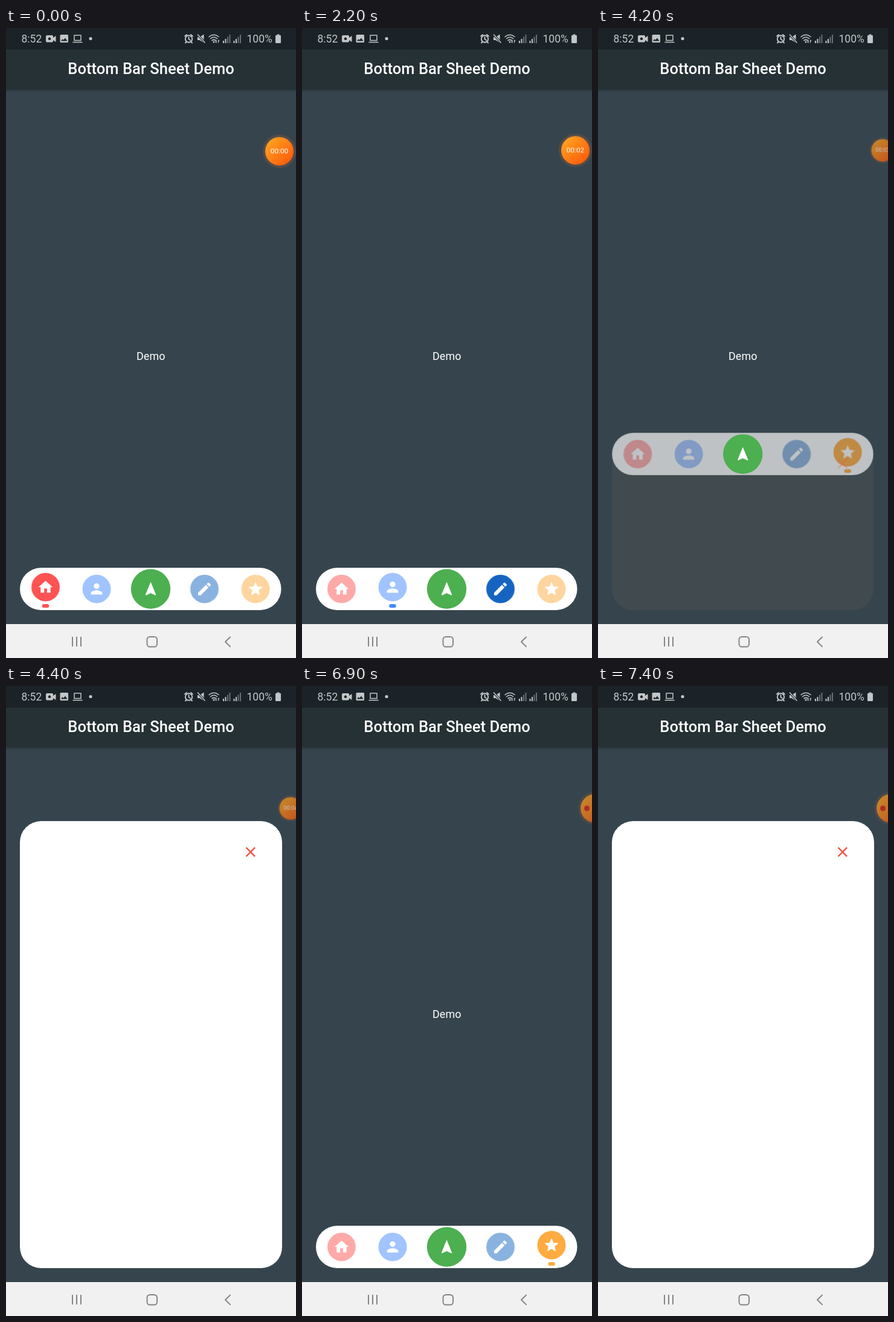
These frames come from a looping animation (480 by 1040 pixels, 8000 ms). An HTML page:

```html
<!DOCTYPE html>
<html lang="en">
<head>
<meta charset="utf-8">
<title>Bottom Bar Sheet Demo</title>
<style>
@property --open { syntax: "<number>"; inherits: true; initial-value: 0; }
@property --up { syntax: "<number>"; inherits: true; initial-value: 0; }
@property --sec { syntax: "<integer>"; inherits: true; initial-value: 0; }

html, body { margin: 0; width: 100%; height: 100%; overflow: hidden; background: #36454d; }
body { position: relative; font-family: Roboto, sans-serif; }
svg { position: absolute; left: 0; top: 0; width: 480px; height: 1040px; }

/* Every part shares one 8 s clock that advances in 100 ms ticks */
#stage, #status, #badge, #time, #time::before, #dot, #ripple, .lit, .item {
  animation: 8s step-end -5ms infinite;
}

/* Expanding sheet */
#stage { position: absolute; width: 480px; height: 1040px; overflow: hidden; animation-name: sheet; }
#sheet {
  --grey: calc(255 * var(--open));
  position: absolute; left: 23px; top: calc(891px - 668px * var(--open));
  width: calc(432.5px + 1.5px * var(--open)); height: calc(70px + 668px * var(--open));
  border-radius: 35px; overflow: hidden;
  background: rgba(var(--grey), var(--grey), var(--grey), var(--open));
}
#ripple {
  position: absolute; left: 340px; top: 10.5px; width: 82px; height: 82px;
  border-radius: 50%; background: rgba(255, 255, 255, .09); animation-name: ripple;
}
.bar { transform: translate(calc(.7px * var(--open)), calc(-668px * var(--open))); }
#tabs { opacity: calc(1 - var(--open)); }
#main { opacity: calc(1.8 - 1.8 * var(--open)); }
#close { transform: translate(404.8px, calc(274px + 668px * (1 - var(--open)))); opacity: var(--open); }
@keyframes sheet {
  0% { --open: 0; }
  51.25% { --open: 0; animation-timing-function: steps(3); }
  55% { --open: 1; }
  75% { --open: .734; animation-timing-function: steps(3); }
  78.75% { --open: 0; }
  88.75% { --open: 0; animation-timing-function: steps(3); }
  92.5%, 100% { --open: 1; }
}
@keyframes ripple {
  0% { opacity: 0; }
  75% { opacity: 1; }
  78.75%, 100% { opacity: 0; }
}

/* Tabs: colour switches at once, then the icon lifts */
.item { fill: var(--c); }
.lift { transform: translateY(calc(-3px * var(--up))); }
.mark { opacity: var(--up); transform: scale(var(--up)); transform-origin: 0 28px; }
.icon { fill: #fff; transform: scale(1.17) translate(-12px, -12px); }
#home { --c: #ff5252; animation-name: homeUp; }
#user { --c: #448aff; animation-name: userUp; }
#pen { --c: #1565c0; animation-name: penUp; }
#star { --c: #ffab40; animation-name: starUp; }
#home .lit { animation-name: homeLit; }
#user .lit { animation-name: userLit; }
#pen .lit { animation-name: penLit; }
#star .lit { animation-name: starLit; }
@keyframes homeLit { 0% { opacity: 1; } 15%, 100% { opacity: .5; } }
@keyframes userLit { 0% { opacity: .5; } 15% { opacity: 1; } 27.5%, 100% { opacity: .5; } }
@keyframes penLit { 0% { opacity: .5; } 27.5% { opacity: 1; } 38.75%, 100% { opacity: .5; } }
@keyframes starLit { 0% { opacity: .5; } 38.75%, 100% { opacity: 1; } }
@keyframes homeUp {
  0% { --up: 1; }
  17.5% { --up: 1; animation-timing-function: steps(2); }
  20%, 100% { --up: 0; }
}
@keyframes userUp {
  0% { --up: 0; }
  17.5% { --up: 0; animation-timing-function: steps(2); }
  20% { --up: 1; }
  27.5% { --up: 1; animation-timing-function: steps(3); }
  31.25%, 100% { --up: 0; }
}
@keyframes penUp {
  0% { --up: 0; }
  27.5% { --up: 0; animation-timing-function: steps(3); }
  31.25% { --up: 1; }
  38.75% { --up: 1; animation-timing-function: steps(3); }
  42.5%, 100% { --up: 0; }
}
@keyframes starUp {
  0% { --up: 0; }
  38.75% { --up: 0; animation-timing-function: steps(3); }
  42.5%, 100% { --up: 1; }
}

/* Recorder badge */
#badge {
  position: absolute; left: -23.5px; top: -23.5px; width: 47px; height: 47px; border-radius: 50%;
  background: linear-gradient(135deg, #ffa41f 10%, #ff5a0a 90%);
  box-shadow: 0 0 0 4px rgba(125, 85, 70, .45); animation-name: badge;
}
#time {
  position: absolute; inset: 0; text-align: center; font-size: 11.8px; line-height: 47px;
  color: #fff; counter-reset: s var(--sec); animation-name: tick, text;
}
#time::before { content: "00:" counter(s, decimal-leading-zero); }
#dot {
  position: absolute; left: 6px; top: 19px; width: 9px; height: 9px; border-radius: 50%;
  background: #dc2418; animation-name: dot;
}
@keyframes badge {
  0% { transform: translate(452px, 203px) scale(1); opacity: 1; }
  2.5% { transform: translate(452px, 201.5px) scale(1); opacity: 1; }
  31.25% { transform: translate(452px, 201.5px) scale(1); opacity: 1; animation-timing-function: steps(5); }
  37.5% { transform: translate(470.5px, 201.5px) scale(.79); opacity: .72; }
  76.25% { transform: translate(470.5px, 201.5px) scale(.79); opacity: .72; animation-timing-function: steps(3); }
  80%, 100% { transform: translate(484px, 201.5px) scale(1); opacity: .72; }
}
@keyframes tick {
  0% { --sec: 0; }
  13.75% { --sec: 1; }
  27.5% { --sec: 2; }
  41.25% { --sec: 3; }
  55% { --sec: 4; }
  68.75%, 100% { --sec: 5; }
}
@keyframes text { 0% { opacity: 1; } 78.75%, 100% { opacity: 0; } }
@keyframes dot { 0% { opacity: 0; } 78.75%, 100% { opacity: 1; } }

/* Status bar notices */
#status { animation-name: notice; }
@keyframes notice {
  0% { opacity: 1; }
  83.75% { opacity: .6; }
  85% { opacity: .8; }
  86.25%, 100% { opacity: 1; }
}
.line { fill: none; stroke-linecap: round; stroke-linejoin: round; }
</style>
</head>
<body>
<div id="stage">
  <svg>
    <defs>
      <linearGradient id="shade" x2="0" y2="1">
        <stop offset="0" stop-color="#1f292d" stop-opacity=".75"/>
        <stop offset="1" stop-color="#1f292d" stop-opacity="0"/>
      </linearGradient>
    </defs>
    <rect y="100" width="480" height="6" fill="url(#shade)"/>
    <rect width="480" height="101" fill="#253135"/>
    <rect width="480" height="35.5" fill="#1b2328"/>
    <text x="240" y="76" text-anchor="middle" font-size="25.5" font-weight="500" letter-spacing=".05" fill="#fff">Bottom Bar Sheet Demo</text>
    <text x="239.8" y="548" text-anchor="middle" font-size="17.9" letter-spacing=".1" fill="#fff">Demo</text>

    <g fill="#c3c6c8" stroke="none">
      <text x="25.5" y="24" font-size="17.5">8:52</text>
      <text x="398.5" y="24" font-size="17.5">100%</text>
      <g id="status">
        <path fill-rule="evenodd" d="M68 12h8q2 0 2 2v2l4.500-3v10l-4.500-3v1.500q0 2-2 2h-8q-2 0-2-2v-7.500q0-2 2-2zM72 15.500a2.300 2.300 0 1 0 .01 0z"/>
        <path fill-rule="evenodd" d="M91 11h10.500q1.500 0 1.500 1.500v10q0 1.500-1.500 1.500h-10.500q-1.500 0-1.500-1.500v-10q0-1.500 1.500-1.500zM91 21.500h10.500l-3.500-5-2.800 3.500-1.700-2z"/>
        <path class="line" stroke="#c3c6c8" stroke-width="1.500" d="M113 12h11v8.500h-11zM111 23.500h15"/>
        <circle cx="140" cy="17.500" r="2.600"/>
      </g>
      <g class="line" stroke="#c3c6c8" stroke-width="1.900">
        <circle cx="302.500" cy="18" r="5.700"/>
        <path d="M302.500 15v3.500l2.500 1.500M296 13.500l3-2.500M309 13.500l-3-2.500M298.500 23l-1.500 1.500M306.500 23l1.500 1.500"/>
      </g>
      <path d="M317 15h3.500l7-4.500v14l-7-4.500h-3.500z"/>
      <path d="M317 10.500l12.500 14" stroke="#1b2328" stroke-width="3.500"/>
      <path d="M317 10.500l12.500 14" stroke="#c3c6c8" stroke-width="1.500"/>
      <g class="line" stroke="#c3c6c8" stroke-width="1.600">
        <path d="M336 14.500q8-6.500 16 0M338.500 17.500q5.500-4.500 11 0M341 20.500q3-2.300 6 0"/>
        <path stroke-width="1.200" d="M348 20v4l-1.200-1.200M351.500 24v-4l1.200 1.200"/>
      </g>
      <circle cx="344" cy="23" r="1.500"/>
      <g id="signal">
        <path d="M359 21h2v4h-2zM362.500 18h2v7h-2z"/>
        <path fill="#687074" d="M366 14.500h2v10.500h-2zM369.500 11h2v14h-2z"/>
      </g>
      <use href="#signal" x="17.500"/>
      <path d="M448.500 10.500h4v1.500h1.500q1 0 1 1v11q0 1-1 1h-7q-1 0-1-1v-11q0-1 1-1h1.500z"/>
    </g>

    <rect y="984" width="480" height="56" fill="#f1f1f1"/>
    <g class="line" stroke="#858585" stroke-width="2">
      <path d="M110 1005v16M117 1005v16M124 1005v16" stroke-linecap="butt"/>
      <rect x="233.500" y="1005" width="16.500" height="16.500" rx="4.500"/>
      <path d="M371 1005.500l-8 7.800 8 7.800"/>
    </g>
  </svg>

  <div id="sheet"><div id="ripple"></div></div>

  <svg>
    <g class="bar">
      <g id="tabs">
        <rect x="23" y="891" width="432.500" height="70" rx="35" fill="#fff"/>
        <g transform="translate(65.500 926)"><g id="home" class="item">
          <rect class="mark" x="-5.800" y="25" width="11.600" height="6" rx="3"/>
          <g class="lift"><circle class="lit" r="23.500"/>
            <path class="icon" d="M10 20v-6h4v6h5v-8h3L12 3 2 12h3v8z"/></g>
        </g></g>
        <g transform="translate(150 926)"><g id="user" class="item">
          <rect class="mark" x="-5.800" y="25" width="11.600" height="6" rx="3"/>
          <g class="lift"><circle class="lit" r="23.500"/>
            <path class="icon" d="M12 12c2.210 0 4-1.790 4-4s-1.790-4-4-4-4 1.790-4 4 1.790 4 4 4zm0 2c-2.670 0-8 1.340-8 4v2h16v-2c0-2.660-5.330-4-8-4z"/></g>
        </g></g>
        <g transform="translate(328.500 926)"><g id="pen" class="item">
          <rect class="mark" x="-5.800" y="25" width="11.600" height="6" rx="3"/>
          <g class="lift"><circle class="lit" r="23.500"/>
            <path class="icon" d="M3 17.250V21h3.750L17.810 9.940l-3.750-3.750zM20.710 7.040c.39-.39.39-1.020 0-1.410l-2.340-2.340c-.39-.39-1.020-.39-1.410 0l-1.830 1.830 3.750 3.750z"/></g>
        </g></g>
        <g transform="translate(413 926)"><g id="star" class="item">
          <rect class="mark" x="-5.800" y="25" width="11.600" height="6" rx="3"/>
          <g class="lift"><circle class="lit" r="23.500"/>
            <path class="icon" d="M12 17.270L18.180 21l-1.640-7.030L22 9.240l-7.190-.61L12 2 9.190 8.630 2 9.240l5.460 4.730L5.820 21z"/></g>
        </g></g>
      </g>
      <g id="main">
        <g transform="translate(239.500 926)">
          <circle r="32.700" fill="#4caf50"/>
          <path class="icon" d="M12 2L4.500 20.290l.71.71L12 18l6.790 3 .71-.71z"/>
        </g>
      </g>
    </g>
    <path id="close" d="M-7.300-7.300L7.300 7.300M7.300-7.300L-7.300 7.300" stroke="#f0574c" stroke-width="2.600"/>
  </svg>

  <div id="badge"><div id="time"></div><div id="dot"></div></div>
</div>
</body>
</html>
```
